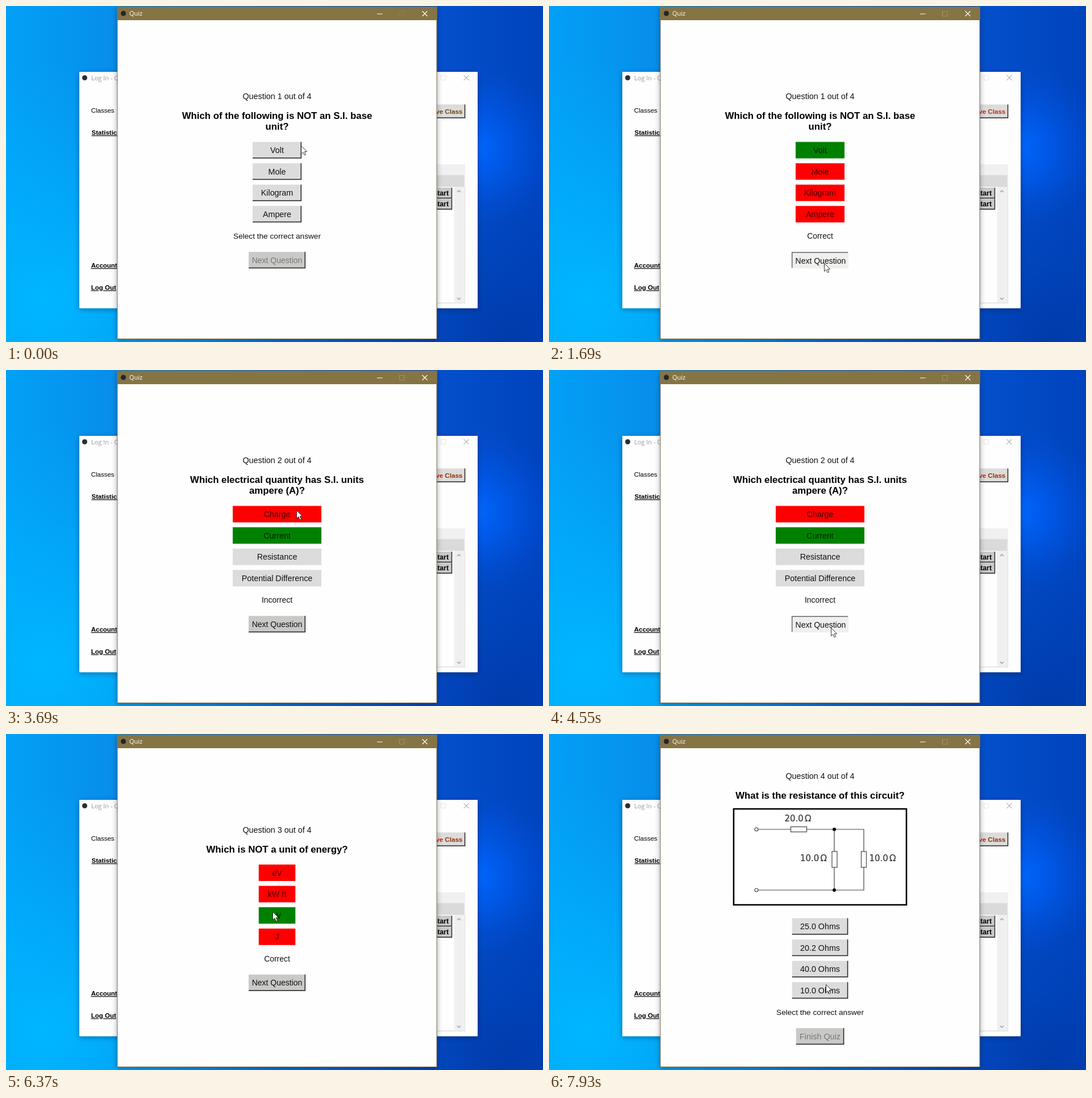
Animation, 945 px wide and 592 px high, one loop 8 s. Source, as an HTML page:

```html
<!DOCTYPE html>
<html lang="en">
<head>
<meta charset="utf-8">
<title>Quiz</title>
<style>
html, body { margin: 0; width: 100%; height: 100%; overflow: hidden; }
svg { display: block; width: 945px; height: 592px; }
text { font-family: "Liberation Sans", Arial, sans-serif; white-space: pre; }
.bold { font-weight: bold; }
.caption { font-family: "Open Sans", sans-serif; font-size: 11px; }
.side { font-size: 11.5px; }
.link { font-weight: bold; text-decoration: underline; }
.ohm { font-family: "DejaVu Sans", sans-serif; font-size: 15px; fill: #333; stroke: #333; stroke-width: .2; }
</style>
</head>
<body>
<svg viewBox="0 0 945 592" xmlns="http://www.w3.org/2000/svg">
  <defs>
    <linearGradient id="sky">
      <stop offset="0" stop-color="#03a0f6"/>
      <stop offset=".2" stop-color="#078eea"/>
      <stop offset=".5" stop-color="#0a70dc"/>
      <stop offset=".8" stop-color="#0450cc"/>
      <stop offset="1" stop-color="#0043bd"/>
    </linearGradient>
    <radialGradient id="cyan" gradientUnits="userSpaceOnUse" cx="70" cy="520" r="430">
      <stop offset="0" stop-color="#00b6ff"/>
      <stop offset="1" stop-color="#00b0ff" stop-opacity="0"/>
    </radialGradient>
    <radialGradient id="glow" gradientUnits="userSpaceOnUse" cx="825" cy="250" r="150">
      <stop offset="0" stop-color="#0068ff"/>
      <stop offset=".4" stop-color="#005cf0" stop-opacity=".7"/>
      <stop offset="1" stop-color="#0050dc" stop-opacity="0"/>
    </radialGradient>
    <radialGradient id="dusk" gradientUnits="userSpaceOnUse" cx="880" cy="592" r="290">
      <stop offset="0" stop-color="#0038a4" stop-opacity=".8"/>
      <stop offset="1" stop-color="#0040b4" stop-opacity="0"/>
    </radialGradient>
    <filter id="shadow" x="-10%" y="-10%" width="120%" height="120%">
      <feDropShadow dx="0" dy="2" stdDeviation="5" flood-color="#001830" flood-opacity=".38"/>
    </filter>
  </defs>

  <g id="desktop">
    <rect width="945" height="592" fill="url(#sky)"/>
    <rect width="945" height="592" fill="url(#cyan)"/>
    <rect width="945" height="592" fill="url(#glow)"/>
    <rect width="945" height="592" fill="url(#dusk)"/>
  </g>

  <g id="login">
    <rect x="129" y="116" width="701" height="416.5" fill="#fefefe" filter="url(#shadow)"/>
    <circle cx="138.5" cy="126.5" r="4.5" fill="#263038"/>
    <text class="caption" x="150" y="130.5" fill="#999">Log In - Quiz</text>
    <rect x="765.5" y="122.5" width="8" height="8" fill="none" stroke="#e6e6e6"/>
    <path d="M805.5 122l9 9m0-9l-9 9" stroke="#8a8a8a" fill="none"/>
    <g class="side">
      <text x="149.7" y="188">Classes</text>
      <text class="link" x="150.5" y="227">Statistics</text>
      <text class="link" x="149.7" y="461">Account</text>
      <text class="link" x="149.7" y="500">Log Out</text>
    </g>
    <rect x="740" y="173.5" width="67.5" height="23.5" fill="#dcdcda"/>
    <path d="M740 197h67.5v-23.5" fill="none" stroke="#222" stroke-width="1.5"/>
    <text id="remove" class="bold" x="803.3" y="189.5" font-size="11.6" text-anchor="end"></text>
    <rect x="740" y="279" width="68" height="245" fill="#f0f0f0"/>
    <rect x="740" y="298" width="66.5" height="20.5" fill="#dadada"/>
    <rect x="740" y="319" width="48.5" height="203" fill="#fefefe"/>
    <path d="M740 523.5h67.5V319" fill="none" stroke="#dedede"/>
    <path d="M794 328l3-3 3 3M794 514l3 3 3-3" fill="none" stroke="#9a9a9a" stroke-width="1.3"/>
    <g id="starts"></g>
  </g>

  <g id="quiz">
    <rect x="196" y="1.5" width="562" height="585" fill="#fefefe" stroke="#7d7150" filter="url(#shadow)"/>
    <rect x="195.5" y="1.5" width="563" height="23.5" fill="#857444"/>
    <circle cx="206.5" cy="13" r="4.5" fill="#20262b"/>
    <text class="caption" x="217" y="17.3" fill="#fff">Quiz</text>
    <path d="M653 14h9.5M732.5 9l9 9m0-9l-9 9" stroke="#fff" stroke-width="1.2" fill="none"/>
    <rect id="maximize" x="692.5" y="9.5" width="8.5" height="8.5" fill="none" stroke="#a29368"/>
    <g id="page"></g>
  </g>

  <path id="cursor" d="M.5 .5V14.6L3.8 11.5 6.2 16.8 8.5 15.8 6.2 10.7H10.6Z" fill="#fff" stroke="#222" stroke-width=".9"/>
</svg>

<script>
const LOOP = 8000, MID = 477;
const RED = "#fe0000", GREEN = "#008000", GREY = "#dcdcdc";
const $ = id => document.getElementById(id);

const questions = [
  { start: 0, press: 80, answer: 170, next: 1340, top: 164, first: 254, width: 86,
    title: ["Which of the following is NOT an S.I. base", "unit?"],
    options: ["Volt", "Mole", "Kilogram", "Ampere"], right: 0, chosen: 0 },
  { start: 1820, press: 3560, answer: 3660, next: 4360, top: 164, first: 254, width: 156,
    title: ["Which electrical quantity has S.I. units", "ampere (A)?"],
    options: ["Charge", "Current", "Resistance", "Potential Difference"], right: 1, chosen: 0 },
  { start: 5020, press: 6290, answer: 6360, next: 7040, top: 173.5, first: 244.5, width: 64.5,
    title: ["Which is NOT a unit of energy?"],
    options: ["eV", "kW h", "W", "J"], right: 2, chosen: 2 },
  { start: 7480, press: LOOP, answer: LOOP, next: LOOP, top: 79, first: 339, width: 98.5,
    title: ["What is the resistance of this circuit?"], circuit: true, last: true,
    options: ["25.0 Ohms", "20.2 Ohms", "40.0 Ohms", "10.0 Ohms"] }
];

// time, x, y of the pointer tip
const track = [
  [0, 519, 246], [230, 519, 246], [860, 486, 451], [940, 486, 451], [1340, 484, 453],
  [2589, 484, 453], [2590, 499, 404], [3080, 511, 247], [3740, 511, 247], [4340, 496, 454],
  [5510, 496, 454], [6080, 469, 313], [6430, 469, 313], [6850, 486, 447], [7030, 487, 441],
  [LOOP, 487, 441]
];

const label = (str, y, size, { x = MID, fill = "#111", cls = "" } = {}) =>
  `<text class="${cls}" x="${x}" y="${y}" font-size="${size}" fill="${fill}" text-anchor="middle">${str}</text>`;

function button(str, cy, width, { size = 14.3, fill = GREY, ink = "#111", relief = "raised" } = {}) {
  const x = MID - width / 2, y = cy - 14.5, h = 29;
  const sunken = relief === "sunken", shift = sunken ? 0.9 : 0;
  let edge = "";
  if (relief === "raised")
    edge = `<path d="M${x} ${y + h - .7}h${width - .7}v${-h + .7}" fill="none" stroke="#222" stroke-width="1.5"/>`;
  if (sunken)
    edge = `<path d="M${x + .7} ${y + h - 1}v${2 - h}h${width - 1.5}" fill="none" stroke="#666" stroke-width="1.5"/>`;
  return `<rect x="${x}" y="${y}" width="${width}" height="${h}" fill="${sunken ? "#efefed" : fill}"/>` + edge +
    label(str, cy + 5 + shift, size, { x: MID + shift, fill: ink });
}

function circuit() {
  const ohms = (value, x, y) => `<text class="ohm" x="${x}" y="${y}">${value}<tspan dx="2">Ω</tspan></text>`;
  return `<rect x="325" y="132" width="304" height="169" fill="#fff" stroke="#000" stroke-width="2.6"/>
    <g fill="#fff" stroke="#444" stroke-width="1.2">
      <path d="M368 168H554V275H368M502 168V275" fill="none"/>
      <circle cx="365" cy="168" r="3"/><circle cx="365" cy="275" r="3"/>
      <rect x="425.5" y="163.5" width="28" height="9"/>
      <rect x="498" y="207" width="9" height="28"/>
      <rect x="549.5" y="207" width="9" height="28"/>
    </g>
    <circle cx="502" cy="168" r="3"/><circle cx="502" cy="275" r="3"/>` +
    ohms("20.0", 414.5, 154) + ohms("10.0", 442, 224) + ohms("10.0", 563.5, 224);
}

function optionStyle(q, i, pressed, answered) {
  if (!answered) return pressed && i === q.chosen ? { relief: "sunken" } : {};
  const correct = q.chosen === q.right;
  if (i === q.right) return { fill: GREEN, ink: "#002400", relief: "flat" };
  if (correct || i === q.chosen) return { fill: RED, ink: "#480000", relief: "flat" };
  return { relief: "flat" };
}

function page(q, pressed, answered, leaving) {
  const number = questions.indexOf(q) + 1;
  const feedback = !answered ? "Select the correct answer" : q.chosen === q.right ? "Correct" : "Incorrect";
  return label(`Question ${number} out of 4`, q.top, 14.35) +
    q.title.map((line, i) => label(line, q.top + 35 + i * 19, 16.8, { cls: "bold", fill: "#000" })).join("") +
    (q.circuit ? circuit() : "") +
    q.options.map((o, i) => button(o, q.first + i * 37.6, q.width, optionStyle(q, i, pressed, answered))).join("") +
    label(feedback, q.first + 156.3, answered ? 13.9 : 13.65) +
    button(q.last ? "Finish Quiz" : "Next Question", q.first + 193.8, q.last ? 84.5 : 100, {
      size: q.last ? 14.4 : 14, fill: "#c9c9c7", ink: answered ? "#111" : "#777",
      relief: leaving ? "sunken" : "raised"
    });
}

function pointer(t) {
  const i = track.findIndex(k => k[0] > t);
  const [t0, x0, y0] = track[i - 1], [t1, x1, y1] = track[i];
  const u = (t - t0) / (t1 - t0);
  const e = t0 === 2590 ? 1 - (1 - u) ** 2 : u * u * (3 - 2 * u);
  return [x0 + (x1 - x0) * e, y0 + (y1 - y0) * e];
}

$("starts").innerHTML = [320, 339.5].map(y =>
  `<rect x="740" y="${y}" width="44.5" height="18.5" fill="#c9c9c9"/>
   <path d="M740 ${y + 18.5}h44.5v-18.5" fill="none" stroke="#222" stroke-width="1.4"/>
   <text class="bold" x="779" y="${y + 13.7}" font-size="12.3" text-anchor="end">Start</text>`).join("");

let shown = "";
function render(t) {
  const q = questions.findLast(item => item.start <= t);
  const state = [t >= q.press, t >= q.answer, t >= q.next];
  const tint = t < 400 ? ["#6b4818", "#6b4818"] : t < 1820 ? ["#c42a12", "#b83018"] : ["#c82008", "#93300f"];
  const key = [q.start, ...state, ...tint].join();
  if (key !== shown) {
    shown = key;
    $("page").innerHTML = page(q, ...state);
    $("remove").innerHTML = `<tspan fill="${tint[0]}">Remove </tspan><tspan fill="${tint[1]}">Class</tspan>`;
    $("maximize").setAttribute("opacity", t < 400 ? .3 : 1);
  }
  $("cursor").setAttribute("transform", `translate(${pointer(t)})`);
}

function tick() {
  render(performance.now() % LOOP);
  requestAnimationFrame(tick);
}
tick();
</script>
</body>
</html>
```
